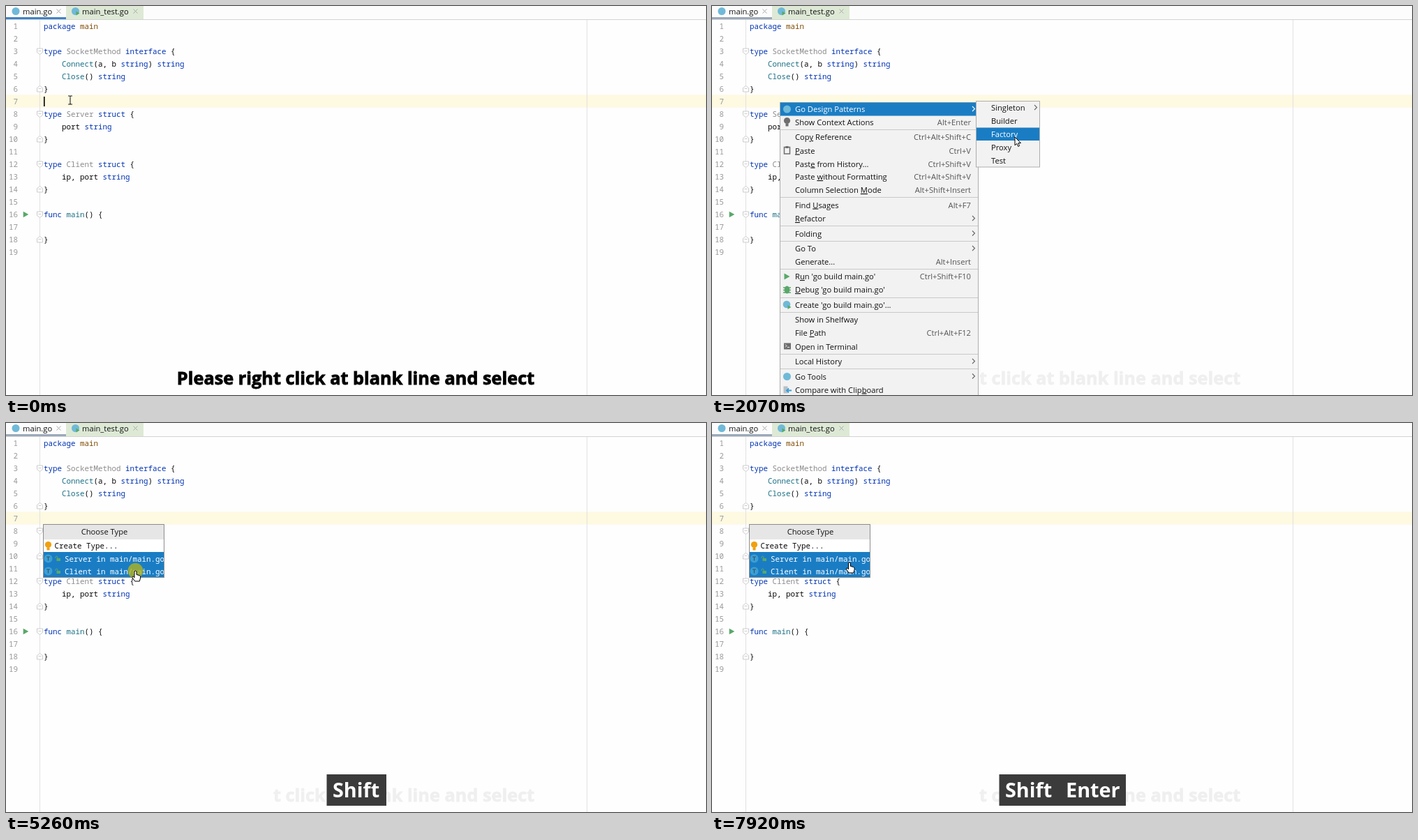
An HTML page for the animation above (8000 ms loop, 1003 px wide and 558 px high).

```html
<!DOCTYPE html>
<html lang="en">
<head>
<meta charset="utf-8">
<title>Design pattern generator</title>
<style>
html, body { margin: 0; width: 100%; height: 100%; overflow: hidden; background: #fefefe; }
svg { display: block; width: 1003px; height: 558px; }
text { font: 11.2px "Open Sans", "Noto Sans", sans-serif; fill: #111; }
.code { font: 10.83px "Noto Sans Mono", "DejaVu Sans Mono", monospace; fill: #080808; }
.num { fill: #999; text-anchor: end; }
.k { fill: #0033b3; }
.u { fill: #8c8c8c; }
.f { fill: #1b7085; }
.p { fill: #804c00; }
.keys { fill: #555; text-anchor: end; }
.mid { text-anchor: middle; }
.mn { text-decoration: underline; }
.caption { font-size: 25.3px; font-weight: 700; fill: #000; stroke: #000; stroke-width: .8; text-anchor: middle; }
.press { font-size: 28.8px; font-weight: 700; fill: #fff; }
.line { fill: none; stroke: #c9c9c9; }
.chev { fill: none; stroke: #666; stroke-width: 1.1; }
.bar { fill: none; }
.on > .bar { fill: #1a7dc4; }
.on > text, .on > text tspan { fill: #fff; }
.on > .chev { stroke: #fff; }
.badge { fill: #8fd3ea; }
.on > .badge { fill: #3b9fd4; }
</style>
</head>
<body>
<svg id="stage" viewBox="0 0 1003 558"></svg>
<script>
const CHAR = 6.5;
const GO_BLUE = '#6fb9d8', GREEN = '#59a869', GREY = '#6e6e6e';

const text = (x, y, s, cls = '') => `<text x="${x}" y="${y}" class="${cls}">${s}</text>`;
const rect = (x, y, w, h, fill, more = '') =>
  `<rect x="${x}" y="${y}" width="${w}" height="${h}" fill="${fill}" ${more}/>`;
const path = (d, more) => `<path d="${d}" ${more}/>`;
const dot = (x, y, r, fill) => `<circle cx="${x}" cy="${y}" r="${r}" fill="${fill}"/>`;
const play = (x, y, r = 4) => path(`M${x - r} ${y - r - .5}L${x + r} ${y}L${x - r} ${y + r + .5}Z`, `fill="${GREEN}"`);
const chevron = (x, y) => path(`M${x} ${y - 3.5}l3.5 3.5l-3.5 3.5`, 'class="chev"');
const group = (id, body, more = '') => `<g id="${id}" ${more}>${body}</g>`;

// Editor
const source = `package main

type SocketMethod interface {
    Connect(a, b string) string
    Close() string
}

type Server struct {
    port string
}

type Client struct {
    ip, port string
}

func main() {

}
`.split('\n');

const tokens = /\b(package|type|interface|struct|func|string)\b|\b(SocketMethod|Server|Client)\b|\b(Connect|Close|main(?=\())|\bmain\b/g;
const paint = s => s.replace(tokens, (m, k, u, f) =>
  `<tspan class="${k ? 'k' : u ? 'u' : f ? 'f' : 'p'}">${m}</tspan>`);

function fold(y, dir) {
  const flat = y - 4 * dir, mid = y + 1.5 * dir, tip = y + 4.5 * dir;
  return path(`M44.5 ${flat}H52.5V${mid}L48.5 ${tip}L44.5 ${mid}ZM46.5 ${y - .5}H50.5`,
    'fill="#fff" stroke="#c6c6c6" stroke-width=".9"');
}

function codeLine(s, i) {
  const y = 29 + 18 * i, code = s.trimStart();
  let out = text(17, y + 4, i + 1, 'code num');
  if (/^(type|func)/.test(s)) out += fold(y, 1);
  if (s === '}') out += fold(y, -1);
  return out + text(54 + CHAR * (s.length - code.length), y + 4, paint(code), 'code');
}

const cross = x => path(`M${x - 3} 4.5l6 6m0-6l-6 6`, 'stroke="#aaa" fill="none"');
const tabs = rect(0, 0, 1003, 19, '#fcfcfc') + rect(86, 0, 111, 19, '#dde9d5') +
  path('M0 19.5H1003', 'stroke="#d3d3d3"') +
  dot(14, 7.5, 5.5, GO_BLUE) + text(24, 11.5, 'main.go') + cross(75.5) +
  dot(99.5, 7.5, 5.5, GO_BLUE) + play(103, 10.5, 2.5) + text(109, 11.5, 'main_test.go') + cross(185.5) +
  rect(0, 16, 86, 3, '#3f83c9', 'id="underline"');

const editor = rect(0, 127.5, 1003, 18, '#fef9e1') +
  path('M48.5 20V558M832.5 20V558', 'stroke="#e2e2e2"') + tabs +
  source.map(codeLine).join('') + play(28.5, 299, 3.8) +
  rect(54, 130, 1.6, 14, '#000', 'id="caret"');

// Context menu; "_" marks the mnemonic letter
const mnemonic = s => s.replace(/_(.)/, '<tspan class="mn">$1</tspan>');
const bulb = (x, y, fill) => dot(x, y - 1.5, 4.6, fill) + rect(x - 2, y + 3, 4, 3.5, fill);
const icons = {
  go: y => dot(107.5, y, 5.5, GO_BLUE),
  bulb: y => bulb(107.5, y - 1, GREY),
  paste: y => rect(103.5, y - 5, 8, 9.5, 'none', `stroke="${GREY}" stroke-width="1.5"`) + rect(105.5, y - 6.5, 4, 3, GREY),
  run: y => play(107.5, y),
  bug: y => path(`M102 ${y - 3}h11M102 ${y + .5}h11M102 ${y + 4}h11`, `stroke="${GREEN}" stroke-width="1.4"`) +
    `<ellipse cx="107.5" cy="${y}" rx="3.8" ry="5.5" fill="${GREEN}"/>`,
  create: y => dot(107, y - 1, 5.3, GO_BLUE) + play(111, y + 3, 2.5),
  term: y => rect(103, y - 5, 10, 9, GREY) + path(`M105 ${y - 3}l2 2l-2 2m3 0h3`, 'fill="none" stroke="#fff"'),
  compare: y => rect(102.5, y - 5, 6, 10, '#b7c0c7') + path(`M114 ${y + 1}h-7m3-3l-3 3l3 3`, 'fill="none" stroke="#389fd6" stroke-width="1.8"')
};
const menuItems = [
  [148, 'Go Design Patterns', '>', 'go'],
  [167, 'Show Context Actions', 'Alt+Enter', 'bulb'],
  [188, 'Cop_y Reference', 'Ctrl+Alt+Shift+C'],
  [207.5, '_Paste', 'Ctrl+V', 'paste'],
  [226.5, 'Past_e from History...', 'Ctrl+Shift+V'],
  [245, 'Paste _without Formatting', 'Ctrl+Alt+Shift+V'],
  [264, 'Column Selection _Mode', 'Alt+Shift+Insert'],
  [285.5, 'Find _Usages', 'Alt+F7'],
  [305, '_Refactor', '>'],
  [326.5, 'Folding', '>'],
  [348, 'Go To', '>'],
  [367, 'Generate...', 'Alt+Insert'],
  [388, "R_un 'go build main.go'", 'Ctrl+Shift+F10', 'run'],
  [407, "_Debug 'go build main.go'", '', 'bug'],
  [429, "Create 'go build main.go'...", '', 'create'],
  [450, 'Show in Shelfway', ''],
  [469, 'File _Path', 'Ctrl+Alt+F12'],
  [488.5, 'Open in Terminal', '', 'term'],
  [510, 'Local History', '>'],
  [531.5, 'Go Tools', '>', 'go'],
  [550.5, 'Compare with Clip_board', '', 'compare']
];
const separators = [177.5, 274.5, 315.5, 337.5, 377.5, 418.5, 439.5, 499.5, 520.5];

const menuRow = ([y, label, keys, icon], i) => group('menu' + i,
  rect(98, y - 9.5, 283, 19, '', 'class="bar"').replace('fill="" ', '') +
  (icon ? icons[icon](y) : '') + text(119, y + 4, mnemonic(label)) +
  (keys === '>' ? chevron(373, y - .5) : text(371, y + 4, keys, 'keys')));

const menu = rect(97.5, 138.5, 284, 440, '#f2f2f2', 'stroke="#adadad"') +
  separators.map(y => path(`M98 ${y}H381`, 'class="line"')).join('') +
  menuItems.map(menuRow).join('');

const subRow = (label, i) => {
  const y = 146 + 19 * i;
  return group('sub' + i, `<rect x="379" y="${y - 9.5}" width="90" height="18.5" class="bar"/>` +
    text(400, y + 4, label) + (i ? '' : chevron(462, y - .5)));
};
const submenu = rect(378.5, 136.5, 91, 94.5, '#f2f2f2', 'stroke="#adadad"') +
  ['Singleton', 'Builder', 'Factory', 'Proxy', 'Test'].map(subRow).join('');

// Type chooser
const typeRow = (name, i) => {
  const y = 176 + 18 * i;
  const body = i
    ? `<circle cx="60.5" cy="${y + .5}" r="6" class="badge"/>` +
      path(`M58 ${y - 2}h5m-2.5 0v5.5`, 'stroke="#35576a" stroke-width="1.2"') +
      rect(72.5, y, 5.5, 4, GREEN) + path(`M71 ${y}v-2q1.5-2 3 0v2`, `fill="none" stroke="${GREEN}"`) +
      text(84, y + 4.5, name, 'code') + text(84 + 7 * CHAR, y + 4.5, 'in main/main.go', 'code u')
    : bulb(60.5, y, '#f0a010') + text(69.5, y + 4, name, 'code');
  return group('type' + i, `<rect x="54" y="${y - 9}" width="173" height="18" class="bar"/>` + body);
};
const popup = rect(53.5, 145.5, 173, 76, '#fff') + rect(54, 146, 172.5, 21, '#e6e6e6') +
  text(141, 160, 'Choose Type', 'mid') +
  `<g clip-path="url(#popupClip)">${['Create Type...', 'Server', 'Client'].map(typeRow).join('')}</g>` +
  rect(53.5, 145.5, 173, 76, 'none', 'stroke="#8c8c8c"');

const keyBox = (x, w, words) => rect(x, 504, w, 45, '#3b3b3b') +
  words.map(([wx, s]) => text(wx, 537, s, 'press')).join('');

const outline = 'fill="#fff" stroke="#000" stroke-width="1" stroke-linejoin="round"';
const pointers =
  group('beam', path('M-3-6H-.8L0-5.3L.8-6H3M0-5.3V5.3M-3 6H-.8L0 5.3L.8 6H3', 'fill="none" stroke="#222" stroke-width="1.1"')) +
  group('arrow', path('M0 0V11.8L2.8 9.3L4.7 13.5L6.6 12.6L4.8 8.6H8.5Z', outline)) +
  group('hand', path('M-1.5 .8Q0-1 1.5 .8V5.5L5.5 6.5Q7.6 7.2 7.2 10L5.8 15H-.8L-4.6 9.8Q-4.8 7.6-3 8.2L-1.5 9.8Z', outline));

document.getElementById('stage').innerHTML =
  `<defs><clipPath id="popupClip">${rect(54, 146, 172.8, 75.5, '#000')}</clipPath>
   <clipPath id="captionClip">${rect(382.5, 500, 400, 58, '#000')}</clipPath></defs>` +
  rect(0, 0, 1003, 558, '#fefefe') + editor +
  group('captionBox', text(501, 542.5, 'Please right click at blank line and select', 'caption'), 'clip-path="none"') +
  group('menu', menu) + group('submenu', submenu) + group('popup', popup) +
  group('shift', keyBox(459.5, 85.5, [[468, 'Shift']])) +
  group('shiftEnter', keyBox(411.5, 181.5, [[420, 'Shift'], [507, 'Enter']])) +
  group('mouse', `<circle id="click" r="11" fill="#b4b51c" opacity=".78"/>` + pointers);

// Timeline in ms
const LOOP = 8000, MENU = 380, HOVER = 1070, SUBMENU = 1460, CLOSE = 2530, POPUP = 2600;
const moves = [ // first step, last step, steps, x, y
  [150, 300, 3, 97, 138],
  [1070, 1070, 1, 116, 147],
  [1150, 1530, 6, 372, 149],
  [1610, 1840, 4, 414, 165],
  [1920, 2070, 3, 434, 188],
  [2140, 2140, 1, 435, 190],
  [2930, 3620, 10, 186, 194],
  [4640, 4710, 2, 185.5, 212],
  [5660, 5730, 2, 188, 212],
  [6750, 6910, 3, 199, 211],
  [7060, 7370, 5, 197, 202],
  [7520, 7520, 1, 197, 200]
];
const clicks = [[300, 380], [2450, 2530], [4400, 4470], [5260, 5340], [5660, 5730], [7520, 7600]];
const subPicks = [[0, []], [1690, [0]], [1840, [1]], [2000, [2]]];
const typePicks = [[0, [0]], [3470, [1]], [5260, [1, 2]], [5660, [2]], [7520, [1, 2]]];
const shiftTimes = [[4640, 5900], [7060, 7920]];

const el = id => document.getElementById(id);
const show = (id, yes) => { el(id).style.display = yes ? '' : 'none'; };
const within = (t, spans) => spans.some(([a, b]) => t >= a && t < b);
const latest = (table, t) => table.filter(([start]) => t >= start).pop()[1];
const select = (prefix, count, picks) => {
  for (let i = 0; i < count; i++) el(prefix + i).classList.toggle('on', picks.includes(i));
};

// Share of a stepped change done by time t; the first step lands on start
function stepped(t, start, end, n) {
  if (t < start) return 0;
  if (t >= end) return 1;
  return (Math.floor((t - start) / ((end - start) / (n - 1)) + 1e-6) + 1) / n;
}

function mouseAt(t) {
  let x = 92, y = 135;
  for (const [start, end, n, toX, toY] of moves) {
    const s = stepped(t, start, end, n), e = s * s * (3 - 2 * s);
    x += (toX - x) * e;
    y += (toY - y) * e;
  }
  return [x, y];
}

function draw(t) {
  const [x, y] = mouseAt(t);
  const menuOpen = t >= MENU && t < CLOSE, popupOpen = t >= POPUP;
  const inPopup = popupOpen && x < 227;

  show('caret', t < MENU);
  el('underline').setAttribute('fill', t < MENU ? '#3f83c9' : '#9ba9b9');
  el('captionBox').setAttribute('clip-path', t < MENU ? 'none' : 'url(#captionClip)');
  el('captionBox').setAttribute('opacity', 1 - .945 * stepped(t, 150, 840, 10));

  show('menu', menuOpen);
  select('menu', 1, t >= HOVER ? [0] : []);
  show('submenu', menuOpen && t >= SUBMENU);
  select('sub', 5, latest(subPicks, t));
  show('popup', popupOpen);
  select('type', 3, latest(typePicks, t));

  show('shift', within(t, shiftTimes));
  show('shiftEnter', t >= 7920);

  el('mouse').setAttribute('transform', `translate(${x} ${y})`);
  show('click', within(t, clicks));
  show('beam', !menuOpen && !inPopup);
  show('arrow', menuOpen);
  show('hand', inPopup);
}

const began = performance.now();
function tick() {
  draw((performance.now() - began) % LOOP);
  requestAnimationFrame(tick);
}
tick();
</script>
</body>
</html>
```
